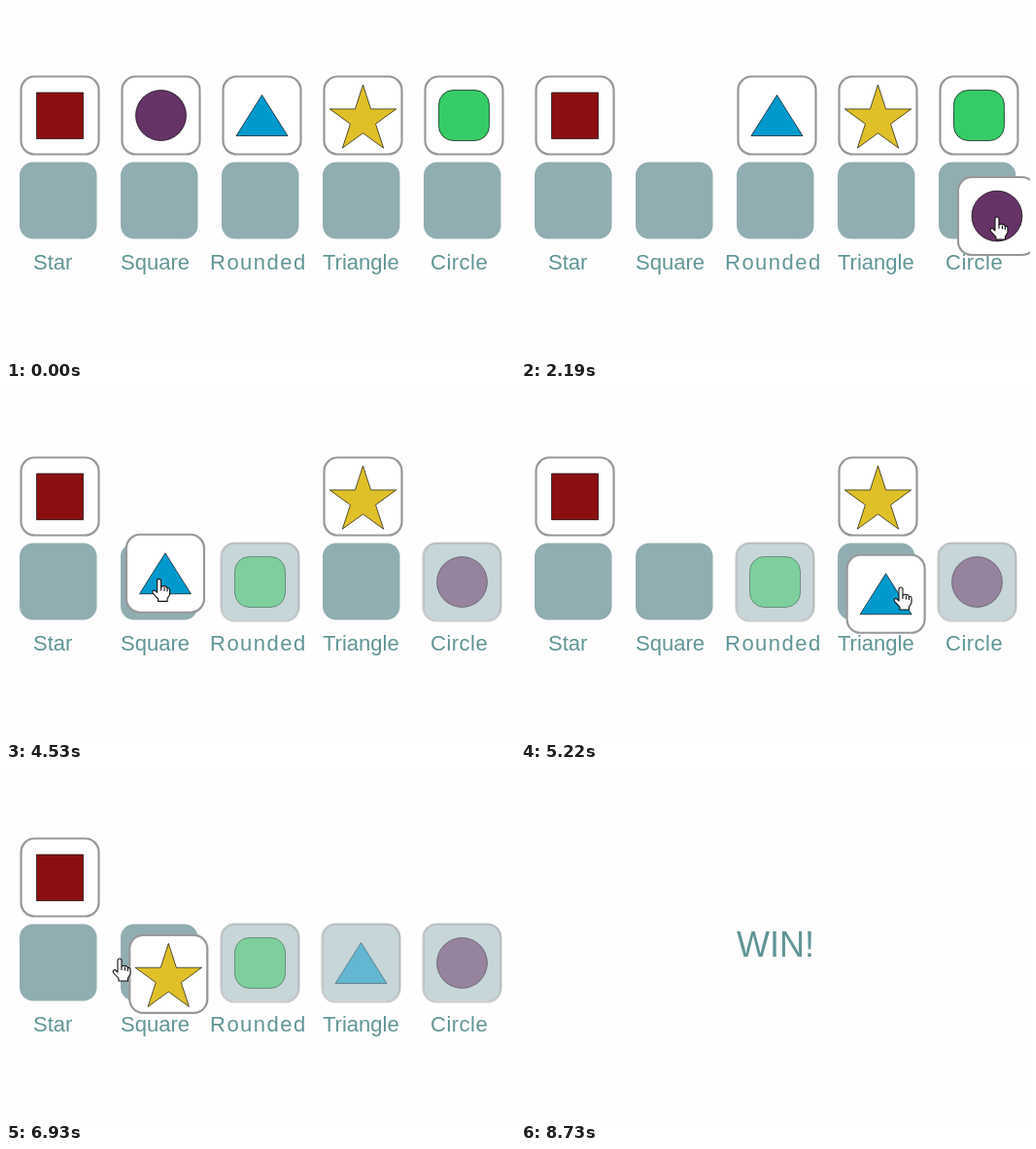
These frames come from a looping animation (524 px wide and 363 px high, 9.15 s). An HTML page with a canvas:

```html
<!DOCTYPE html>
<html lang="en">
<head>
<meta charset="utf-8">
<title>Shape matching game</title>
<style>
  html, body { margin: 0; width: 100%; height: 100%; overflow: hidden; background: #fefefe; }
  #board, canvas { position: absolute; left: 0; top: 0; width: 524px; height: 363px; }
  span, #win { position: absolute; white-space: nowrap; color: #609595; font-family: "Liberation Sans", Arial, sans-serif; }
  span { top: 251px; font-size: 22px; line-height: 25px; }
  #win { left: 0; width: 524px; top: 161px; font-size: 36px; line-height: 41px; text-align: center; opacity: 0; }
</style>
</head>
<body>
<div id="board">
  <span style="left:28px">Star</span>
  <span style="left:118px">Square</span>
  <span style="left:210px;letter-spacing:1.5px">Rounded</span>
  <span style="left:326px">Triangle</span>
  <span style="left:437px;letter-spacing:.5px">Circle</span>
  <canvas></canvas>
</div>
<div id="win">WIN!</div>
<script>
const LOOP = 9150, LAG = 30, STEP = 104;
const board = document.getElementById('board');
const win = document.getElementById('win');
const canvas = document.querySelector('canvas');
const ctx = canvas.getContext('2d');
const dpr = window.devicePixelRatio || 1;
canvas.width = 524 * dpr;
canvas.height = 363 * dpr;

// Pointer path: time, x, y
const path = [
  [60, 484, 59], [480, 190, 106], [690, 160, 113], [930, 134, 180],
  [1560, 63, 196], [1590, 66, 191], [1860, 172, 228], [2160, 490, 216],
  [2190, 490, 217], [2500, 470, 200], [2820, 470, 118], [3300, 249, 199],
  [3500, 261, 201], [3780, 261, 201], [4080, 263, 113], [4590, 149, 206],
  [4690, 143, 214], [5040, 270, 246], [5190, 375, 213], [5220, 391, 206],
  [5400, 367, 200], [5690, 367, 114], [5880, 225, 101], [6100, 225, 101],
  [6420, 260, 150], [6700, 245, 224], [6900, 168, 212], [6930, 118, 196],
  [7020, 52, 198], [7200, 54, 200], [7500, 56, 113], [7950, 146, 197],
  [8050, 155, 200], [8200, 155, 200], [8600, 540, 205]
];

// Cards by home column, with the slot each lands in
const cards = [
  { kind: 'square', color: '#8b0f10', slot: 1, grab: 7500, drop: 8130 },
  { kind: 'circle', color: '#663366', slot: 4, grab: 690, drop: 2490 },
  { kind: 'triangle', color: '#0099cc', slot: 3, grab: 4080, drop: 5370 },
  { kind: 'star', color: '#e0c028', slot: 0, grab: 5690, drop: 7140 },
  { kind: 'rounded', color: '#35cc67', slot: 2, grab: 2850, drop: 3510 }
];

const arrow = new Path2D('M0 0V17L4 13.5L7 19.5L9.6 18.4L6.8 12.5L12 12Z');
const hand = new Path2D('M-2 2Q-2 0 0 0Q2 0 2 2V8Q7 6 8.4 9.4Q11 9 11 11.5V16L8.5 20V23H-1V20.5L-6.5 14.5Q-7.5 11.5 -4.5 11.6L-2 14Z');
const knuckles = new Path2D('M2 8V12M5.5 8.5V12.5M8.4 9.5V13');

const clamp01 = v => Math.max(0, Math.min(1, v));
const slope = (i, k) => (path[i + 1][k] - path[i][k]) / (path[i + 1][0] - path[i][0]);

// Harmonic-mean tangents keep the curve free of overshoot
function tangent(i, k) {
  if (i === 0 || i === path.length - 1) return 0;
  const a = slope(i - 1, k), b = slope(i, k);
  return a * b > 0 ? 2 * a * b / (a + b) : 0;
}

function pointer(t) {
  const last = path.length - 1;
  if (t <= path[0][0]) return path[0].slice(1);
  if (t >= path[last][0]) return path[last].slice(1);
  let i = 0;
  while (path[i + 1][0] < t) i++;
  const h = path[i + 1][0] - path[i][0], s = (t - path[i][0]) / h;
  return [1, 2].map(k =>
    path[i][k] * (1 + 2 * s) * (1 - s) ** 2 + path[i + 1][k] * s * s * (3 - 2 * s) +
    h * (tangent(i, k) * s * (1 - s) ** 2 - tangent(i + 1, k) * s * s * (1 - s)));
}

function polygon(points) {
  points.forEach(([x, y], i) => i ? ctx.lineTo(x, y) : ctx.moveTo(x, y));
  ctx.closePath();
}

const outlines = {
  square: () => ctx.rect(-24, -23.5, 48, 47.5),
  circle: () => ctx.arc(0, 0, 26, 0, 2 * Math.PI),
  triangle: () => polygon([[0, -21], [26.5, 21], [-26.5, 21]]),
  star: () => polygon(Array.from({ length: 10 }, (_, i) => {
    const r = i % 2 ? 13.75 : 36, a = i * Math.PI / 5;
    return [r * Math.sin(a), 4.5 - r * Math.cos(a)];
  })),
  rounded: () => ctx.roundRect(-26, -26, 52, 52, 15)
};

function drawCard(card, x, y, alpha) {
  ctx.save();
  ctx.translate(x, y);
  ctx.globalAlpha = alpha;
  ctx.beginPath();
  ctx.roundRect(-40, -40, 80, 80, 14);
  ctx.fillStyle = '#fff';
  ctx.fill();
  ctx.lineWidth = 2.2;
  ctx.strokeStyle = '#98989b';
  ctx.stroke();
  ctx.beginPath();
  outlines[card.kind]();
  ctx.fillStyle = card.color;
  ctx.fill();
  ctx.lineWidth = 1;
  ctx.strokeStyle = 'rgba(0,0,0,.65)';
  ctx.stroke();
  ctx.restore();
}

function drawPointer([x, y], isHand) {
  const shape = isHand ? hand : arrow;
  ctx.save();
  ctx.translate(x, y);
  ctx.lineJoin = 'round';
  ctx.lineWidth = 1.1;
  ctx.fillStyle = '#fff';
  ctx.strokeStyle = '#111';
  ctx.fill(shape);
  ctx.stroke(shape);
  if (isHand) ctx.stroke(knuckles);
  ctx.restore();
}

function draw(t) {
  const fade = clamp01((t - 8250) / 450);
  board.style.opacity = 1 - fade;
  win.style.opacity = fade;

  ctx.setTransform(dpr, 0, 0, dpr, 0, 0);
  ctx.clearRect(0, 0, 524, 363);
  ctx.fillStyle = '#90adb1';
  for (let i = 0; i < 5; i++) {
    ctx.beginPath();
    ctx.roundRect(14 + STEP * i, 160.5, 79.5, 79, 14);
    ctx.fill();
  }

  const tip = pointer(t);
  let held = null, hover = false;
  cards.forEach((card, i) => {
    if (t >= card.drop) {
      drawCard(card, 53.5 + STEP * card.slot, 200.5, 0.5);
    } else if (t >= card.grab) {
      held = card;
    } else {
      const x = 55.5 + STEP * i, y = 112.5;
      drawCard(card, x, y, 1);
      hover = hover || Math.abs(tip[0] - x) < 41 && Math.abs(tip[1] - y) < 41;
    }
  });
  if (held) drawCard(held, ...pointer(t - LAG), 1);
  if (t >= 60 && t < 8600) drawPointer(tip, held || hover);
}

const start = performance.now();
function tick(now) {
  draw(Math.max(0, now - start) % LOOP);
  requestAnimationFrame(tick);
}
draw(0);
requestAnimationFrame(tick);
</script>
</body>
</html>
```
